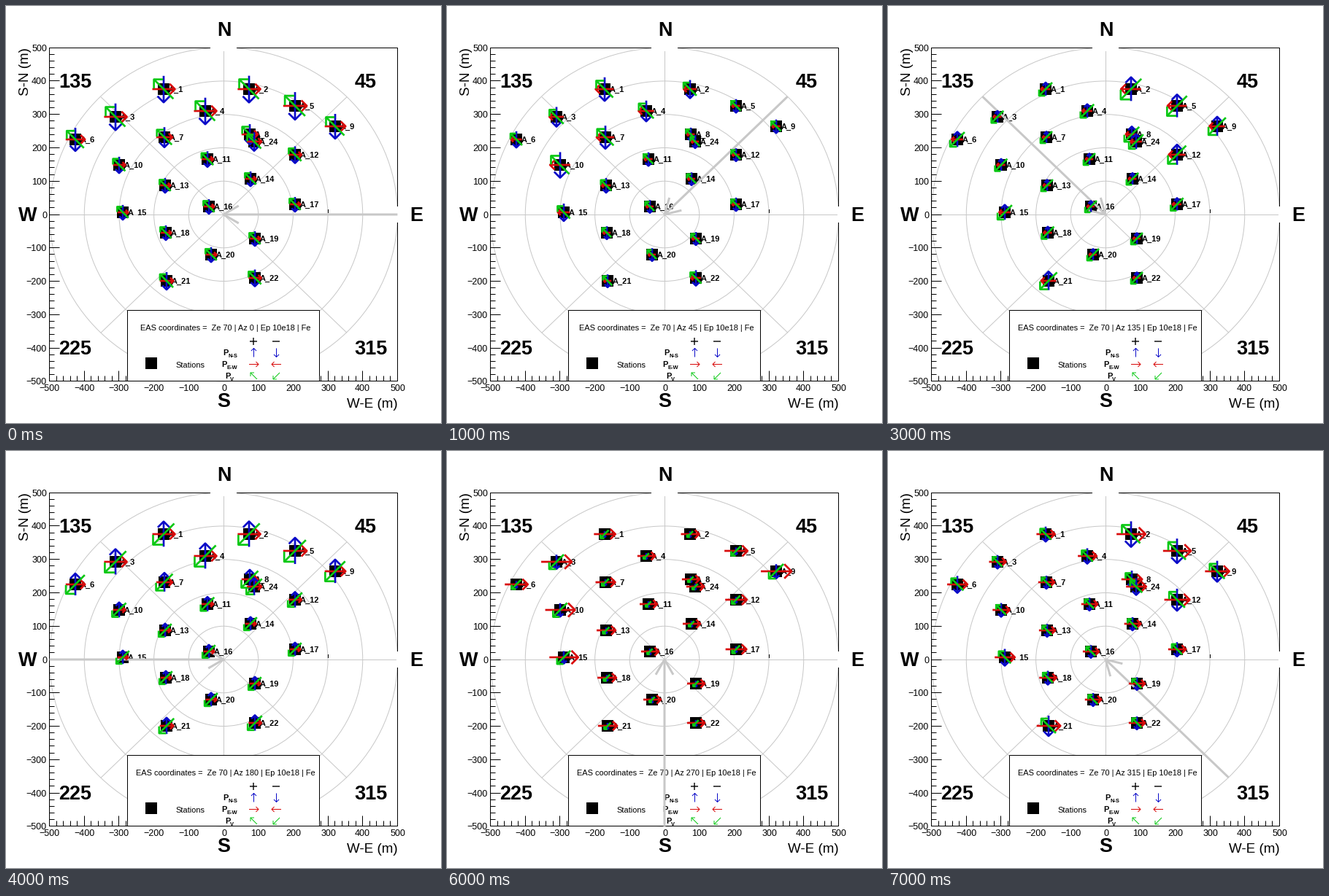
A matplotlib script for the animation above (8 s loop, 596 by 572 pixels).

```python
import numpy as np
import matplotlib.pyplot as plt
from matplotlib.animation import FuncAnimation
from matplotlib.collections import LineCollection
from matplotlib.patches import Ellipse, Rectangle

W, H, DPI = 596, 572, 100
PX = 72 / DPI
CX, CY = 298, 286
SX, SY = 0.8 * W / 1000, 0.8 * H / 1000      # pixels per metre
LEFT, RIGHT, TOP, BOTTOM = 59.5, 536.5, 57.5, 514.5
GREY, BLUE, RED, GREEN = "#c8c8c8", "#0a0ac8", "#d80a0a", "#0ac814"

# evenly spaced columns of stations: numbers, lowest place, highest place
COLUMNS = (
    ((6,), (95, 183), (95, 183)),
    ((15, 10, 3), (160, 283), (150, 152)),
    ((21, 18, 13, 7, 1), (220, 377), (216, 114)),
    ((20, 16, 11, 4), (281, 341), (273, 144)),
    ((22, 19), (341, 373), (341, 319)),
    ((14, 8, 2), (335, 237), (333, 114)),
    ((24,), (340, 186), (340, 186)),
    ((17, 12, 5), (396, 272), (396, 137)),
    ((9,), (451, 165), (451, 165)),
)
STATIONS = {n: tuple(np.round(p))
            for ids, low, high in COLUMNS
            for n, p in zip(ids, np.linspace(low, high, len(ids)))}

fig = plt.figure(figsize=(W / DPI, H / DPI), dpi=DPI, facecolor="white")
ax = fig.add_axes([0, 0, 1, 1])
ax.set(xlim=(0, W), ylim=(H, 0))
ax.axis("off")


def text(x, y, s, size, weight="normal", ha="center", z=3):
    """Put text with its capitals centred on y."""
    return ax.text(x, y + 0.345 * size, s, fontsize=size * PX, weight=weight,
                   family="Liberation Sans", ha=ha, va="baseline", zorder=z)


def line(x, y, color="black", width=1, z=2):
    ax.plot(x, y, color=color, lw=width * PX, zorder=z,
            solid_capstyle="butt", snap=False)


def box(x0, y0, x1, y1, z, face="white", edge="none"):
    ax.add_patch(Rectangle((x0, y0), x1 - x0, y1 - y0, facecolor=face,
                           edgecolor=edge, lw=PX, zorder=z, snap=False))


def arrow(tail, tip, arm, angle):
    """Shaft and open head of an arrow as two polylines."""
    tail, tip = np.array(tail, float), np.array(tip, float)
    back = np.arctan2(*(tail - tip)[::-1])
    ends = [tip + arm * np.array((np.cos(back + a), np.sin(back + a)))
            for a in (-angle, angle)]
    return [np.array([tail, tip]), np.array([ends[0], tip, ends[1]])]


def polar(az, r=500):
    a = np.radians(az)
    return CX + r * SX * np.cos(a), CY - r * SY * np.sin(a)


def draw_grid():
    for r in range(100, 501, 100):
        ax.add_patch(Ellipse((CX, CY), 2 * r * SX, 2 * r * SY, fill=False,
                             edgecolor=GREY, lw=PX, zorder=1))
    for az in range(0, 180, 45):
        (x0, y0), (x1, y1) = polar(az), polar(az + 180)
        line((x0 + 0.5, x1 + 0.5), (y0 + 0.5, y1 + 0.5), GREY, z=1)


def draw_axes():
    box(LEFT, TOP, RIGHT, BOTTOM, 2, "none", "black")
    box(280, 50, 316, 62, 2.5)
    box(535, 275, 545, 297, 2.5)
    for m in range(-500, 501, 20):
        size = 14 if m % 100 == 0 else 7
        x, y = np.floor(CX + m * SX) + 0.5, np.floor(CY - m * SY) + 0.5
        line((x, x), (BOTTOM, BOTTOM - size))
        line((LEFT, LEFT + size), (y, y))
        if m % 100 == 0:
            label = str(m).replace("-", "\u2212")
            text(x, 524, label, 12.5)
            text(56, y, label, 12.5, ha="right")
    line((441.5, 441.5), (279, 284))
    text(536.5, 545, "W-E (m)", 18.8, ha="right")
    ax.text(31, 57, "S-N (m)", fontsize=18.8 * PX, family="Liberation Sans",
            rotation=90, rotation_mode="anchor", ha="right", va="baseline",
            zorder=3)
    for x, y, s in ((299, 32, "N"), (30, 286, "W"), (562, 286, "E"), (298, 541, "S")):
        text(x, y, s, 27, "bold")
    for x, y, s in ((95, 103, "135"), (493, 103, "45"),
                    (95, 469, "225"), (500, 469, "315")):
        text(x, y, s, 27, "bold")


def draw_legend():
    box(166.5, 417.5, 429.5, BOTTOM, 4, edge="black")
    box(191, 482, 207, 498, 5, "black")
    text(252, 492, "Stations", 11, z=5)
    for x in (339, 370):
        line((x - 5, x + 5), (460, 460), width=1.4, z=5)
    line((339, 339), (455, 465), width=1.4, z=5)
    rows = (("N-S", 297, BLUE, (0, -6)), ("E-W", 295, RED, (6.5, 0)),
            ("V", 300, GREEN, (-4.5, -4.5)))
    for i, (sub, x, color, (dx, dy)) in enumerate(rows):
        y = 475 + 16 * i
        text(x, y, "P", 11, "bold", "left", 5)
        text(x + 7.3, y + 4, sub, 7.5, "bold", "left", 5)
        minus = (-dx, -dy) if sub != "V" else (dx, -dy)
        for cx, (ux, uy) in ((339.5, (dx, dy)), (370.5, minus)):
            cy = y + 0.5
            for part in arrow((cx - ux, cy - uy), (cx + ux, cy + uy), 5, np.pi / 4):
                line(part[:, 0], part[:, 1], color, 1, 5)


def draw_stations():
    for n, (x, y) in STATIONS.items():
        box(x - 8, y - 8, x + 8, y + 8, 6, "black")
        text(x + 6.5, y + 0.5, f"A_{n}", 11, "bold", "left", 7)
    box(168, 287, 192, 290, 7.5)


def base_length(x, y, az):
    """Half arrow length: strongest on a ring around the inclined axis."""
    a = np.radians(az)
    dx, dy = x - CX, CY - y
    along = dx * np.cos(a) + dy * np.sin(a)
    across = dy * np.cos(a) - dx * np.sin(a)
    d = np.hypot(across, along * np.cos(np.radians(70)))
    return 10 + 9 * np.exp(-((d - 158) / 52) ** 2)


def components(az):
    """Signed N-S, E-W and vertical strength for one azimuth."""
    c, s = np.cos(np.radians(az)), np.sin(np.radians(az))
    return -0.9 * c - 0.1, 1.13 * (0.45 - s), 1.5 * c - 0.3


def station_arrows(az):
    ns, ew, v = components(az)
    d = np.sqrt(0.5)
    kinds = ((ns, (0, -np.sign(ns)), BLUE), (ew, (np.sign(ew), 0), RED),
             (v, (-d, -d * np.sign(v)), GREEN))
    parts, colors = [], []
    for x, y in STATIONS.values():
        base = base_length(x, y, az)
        for strength, way, color in kinds:
            h = np.clip(base + 4 * np.log(abs(strength)), 4, 21)
            p, step = np.array((x, y)), h * np.array(way)
            parts += arrow(p - step, p + step, 0.66 * h, np.pi / 4)
            colors += [color] * 2
    return parts, colors


draw_grid()
draw_axes()
draw_legend()
draw_stations()
title = text(300.5, 441, "", 11, z=5)
beam = LineCollection([], colors=GREY, linewidths=3 * PX, zorder=8)
field = LineCollection([], linewidths=2.7 * PX, zorder=9)
for lines in (beam, field):
    lines.set_snap(False)
    ax.add_collection(lines, autolim=False)


def update(i):
    az = 45 * i
    beam.set_segments(arrow(polar(az), (CX, CY), 24, np.pi / 6))
    parts, colors = station_arrows(az)
    field.set_segments(parts)
    field.set_color(colors)
    title.set_text(f"EAS coordinates =  Ze 70 | Az {az} | Ep 10e18 | Fe")
    return beam, field, title


anim = FuncAnimation(fig, update, frames=8, interval=1000,
                     init_func=lambda: update(0), repeat=True, repeat_delay=0)
plt.show()
```
